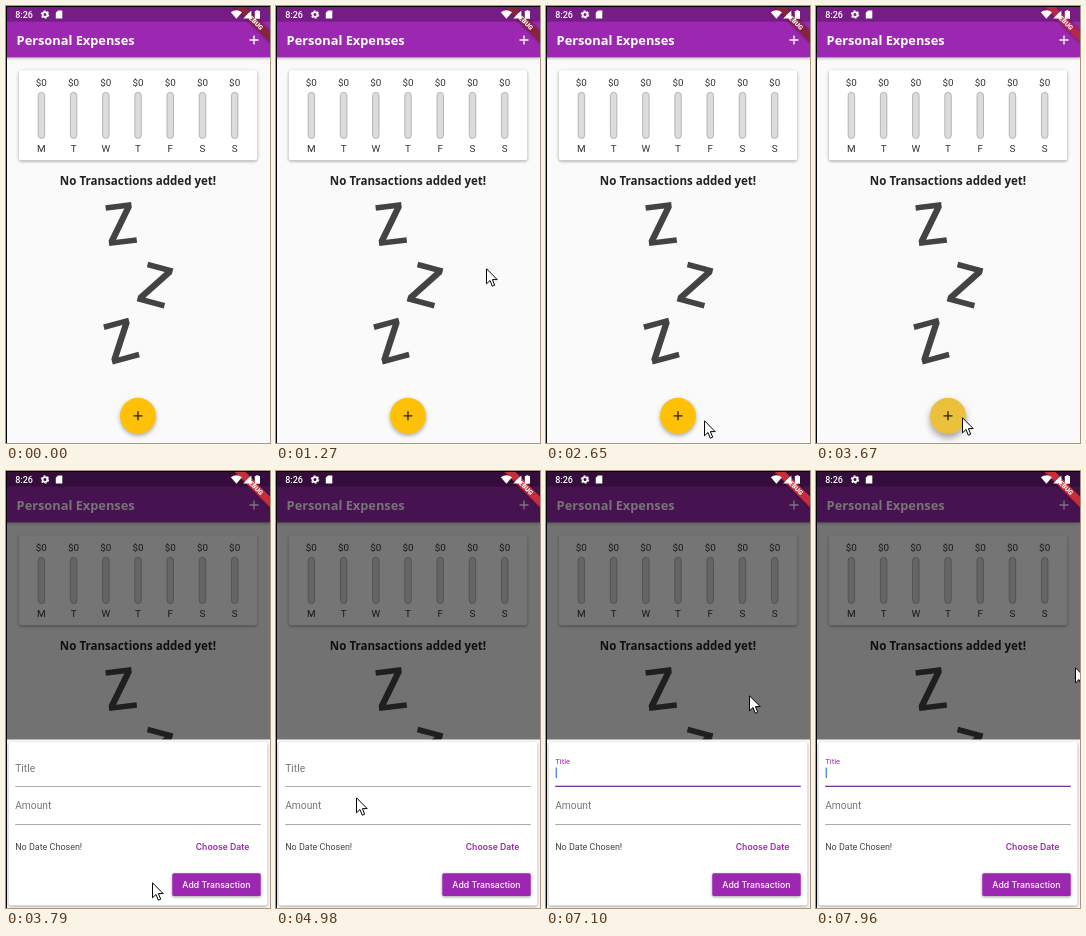
Recreate the animation shown at these times as an HTML page. Size 264 by 437 pixels, loop 8000 ms.

```html
<!DOCTYPE html>
<html lang="en">
<head>
<meta charset="utf-8">
<title>Expense tracker</title>
<style>
  html, body { margin: 0; width: 100%; height: 100%; overflow: hidden; background: #fafafa; }
  svg { display: block; width: 264px; height: 437px; }
  text { font-family: Roboto, sans-serif; }
  .bold { font: 700 12.8px "Open Sans", sans-serif; }
  .mid { text-anchor: middle; }
  .chart { font-size: 9.87px; fill: #333; }
  .label { font-size: 10.25px; fill: #777; }
  .button { font: 500 8.7px Inter, sans-serif; }
  .card { filter: drop-shadow(0 1.3px 1.8px rgba(0, 0, 0, .38)); }
  .bar { filter: drop-shadow(0 1px 1.5px rgba(0, 0, 0, .3)); }
  .fab { fill: #ffc107; filter: drop-shadow(0 2px 2px rgba(0, 0, 0, .32)); }
  .fab.pressed { fill: #ebc03b; filter: drop-shadow(0 4px 3.5px rgba(0, 0, 0, .36)); }
  .ribbon { filter: drop-shadow(0 0 1.5px rgba(0, 0, 0, .5)); }
</style>
</head>
<body>
<svg viewBox="0 0 264 437">
  <defs>
    <path id="zed" d="M-13-20.5H13V-15L-6.5 15H14V20.5H-14V15L5.5-15H-13Z" fill="#434343"/>
    <path id="plus" d="M-4.5 0H4.5M0-4.5V4.5" fill="none" stroke-width="1.35"/>
  </defs>

  <rect width="264" height="437" fill="#fafafa"/>
  <rect class="bar" width="264" height="51.3" fill="#9c27b0"/>
  <rect width="264" height="15.6" fill="#751d84"/>
  <text class="bold" x="10.6" y="38.5" fill="#fff">Personal Expenses</text>
  <use href="#plus" x="248" y="34" stroke="#fff"/>

  <rect class="card" x="12.8" y="64.3" width="238.4" height="90" rx="2.4" fill="#fff"/>
  <g id="chart"></g>

  <text class="bold mid" x="132" y="179.3" fill="#212121" style="font-size:11.55px">No Transactions added yet!</text>
  <use href="#zed" transform="translate(114.7 218) rotate(-7)"/>
  <use href="#zed" transform="translate(149.5 279) rotate(15)"/>
  <use href="#zed" transform="translate(115 335) rotate(-15)"/>

  <circle id="fab" class="fab" cx="132" cy="409.8" r="18"/>
  <use href="#plus" x="132" y="409.8" stroke="#2b2408"/>

  <g id="modal">
    <rect width="264" height="437" fill="#000" fill-opacity=".54"/>
    <rect y="268.5" width="264" height="168.5" fill="#fafafa"/>
    <rect class="card" x="2.6" y="271" width="258.8" height="163.6" rx="2.4" fill="#fff"/>
    <text id="title" class="label" x="9.2">Title</text>
    <rect id="line" x="9.2" width="245.6"/>
    <rect id="caret" x="9.6" y="296.5" width="1.3" height="10.5" fill="#4285f4"/>
    <text class="label" x="9.2" y="338.2">Amount</text>
    <rect x="9.2" y="353" width="245.6" height=".7" fill="#868686"/>
    <text x="9.2" y="379.3" font-size="8.98" fill="#444">No Date Chosen!</text>
    <text class="button mid" x="216.6" y="379.2" fill="#9c27b0" style="font-weight:600">Choose Date</text>
    <rect class="card" x="166.3" y="402.3" width="88.4" height="22.8" rx="1.5" fill="#9c27b0"/>
    <text class="button mid" x="210.4" y="416.8" fill="#fff">Add Transaction</text>
  </g>

  <g transform="translate(264 0) rotate(45)">
    <rect id="ribbon" class="ribbon" x="-27" y="18" width="54" height="7.7"/>
    <text class="mid" y="24.1" font-size="6.5" font-weight="900" fill="#fff">DEBUG</text>
  </g>

  <g fill="#fff">
    <text x="9.2" y="11.8" font-size="9" font-weight="500">8:26</text>
    <circle cx="39" cy="8.6" r="2.4" fill="none" stroke="#fff" stroke-width="1.8"/>
    <circle cx="39" cy="8.6" r="3.7" fill="none" stroke="#fff" stroke-width="1.1" stroke-dasharray="1.94"/>
    <path d="M52 4.6H56.3V12.6H49.8V6.8Z"/>
    <path d="M224.8 6.2Q230.4 2.2 236 6.2L230.4 12.7Z"/>
    <path d="M245.4 4.4V12.6H237.2Z"/>
    <path d="M250.3 4.2H252.5V5H254V12.7H248.8V5H250.3Z"/>
  </g>

  <path id="cursor" d="M.5 .8V15.8L4 12.5L6.3 18.2L8.7 17.2L6.4 11.6H11.2Z" fill="#fff" stroke="#000" stroke-width="1" stroke-linejoin="round"/>
  <path d="M.5 437V.5H264" fill="none" stroke="#000"/>
</svg>
<script>
  const LOOP = 8000;
  const $ = id => document.getElementById(id);
  const set = (id, attrs) => {
    for (const name in attrs) $(id).setAttribute(name, attrs[name]);
  };
  const show = (id, on) => set(id, { visibility: on ? 'visible' : 'hidden' });

  $('chart').innerHTML = [...'MTWTFSS'].map((day, i) => {
    const x = 19.25 + 225.5 * (i + .5) / 7;
    return `<text class="chart mid" x="${x}" y="79.9">$0</text>
      <rect x="${x - 3.2}" y="86.4" width="6.5" height="46" rx="3.1" fill="#dcdcdc" stroke="#9e9e9e" stroke-width=".7"/>
      <text class="chart mid" x="${x}" y="145.8">${day}</text>`;
  }).join('');

  // [time, x, y] of the pointer tip
  const pointer = [
    [850, 180, 296], [1000, 174, 288], [1150, 198, 271], [1270, 210, 262],
    [2200, 222, 350], [2370, 196, 392], [2490, 172, 420], [2650, 158, 414], [2800, 146, 411],
    [4530, 141, 406], [4680, 126, 388], [4830, 122, 384], [4980, 80, 326],
    [5130, 66, 316], [5250, 60, 312], [5370, 57, 309], [5520, 55, 307],
    [7100, 203, 224], [7250, 259, 196]
  ];

  // [time, font size, baseline, colour, line height, line colour] of the title field
  const field = [
    [0, 10.25, 300.6, '#777', .7, '#868686'],
    [6360, 8.4, 295.2, '#9150a0', 1, '#74519a'],
    [6510, 7.7, 292.6, '#9c27b0', 1.3, '#6f3a94']
  ];

  const caretToggles = [6240, 6510, 7100, 7550, 7960];
  const stepAt = (table, t) => table.filter(row => row[0] <= t).pop();

  function draw(t) {
    const tip = stepAt(pointer, t);
    show('cursor', tip);
    if (tip) set('cursor', { transform: `translate(${tip[1]} ${tip[2]})` });

    $('fab').classList.toggle('pressed', t >= 3230);
    set('ribbon', { fill: t < 3670 ? '#86243f' : t < 3790 ? '#b4264a' : '#cb2c3a' });

    const open = t >= 3790;
    $('modal').style.display = open ? '' : 'none';
    if (!open) return;
    const [, size, y, colour, height, lineColour] = stepAt(field, t);
    $('title').style.fontSize = size + 'px';
    $('title').style.fill = colour;
    set('title', { y });
    set('line', { y: 316 - height, height, fill: lineColour });
    show('caret', caretToggles.filter(time => time <= t).length % 2);
  }

  const start = performance.now();
  function tick() {
    draw((performance.now() - start) % LOOP);
    requestAnimationFrame(tick);
  }
  tick();
</script>
</body>
</html>
```
